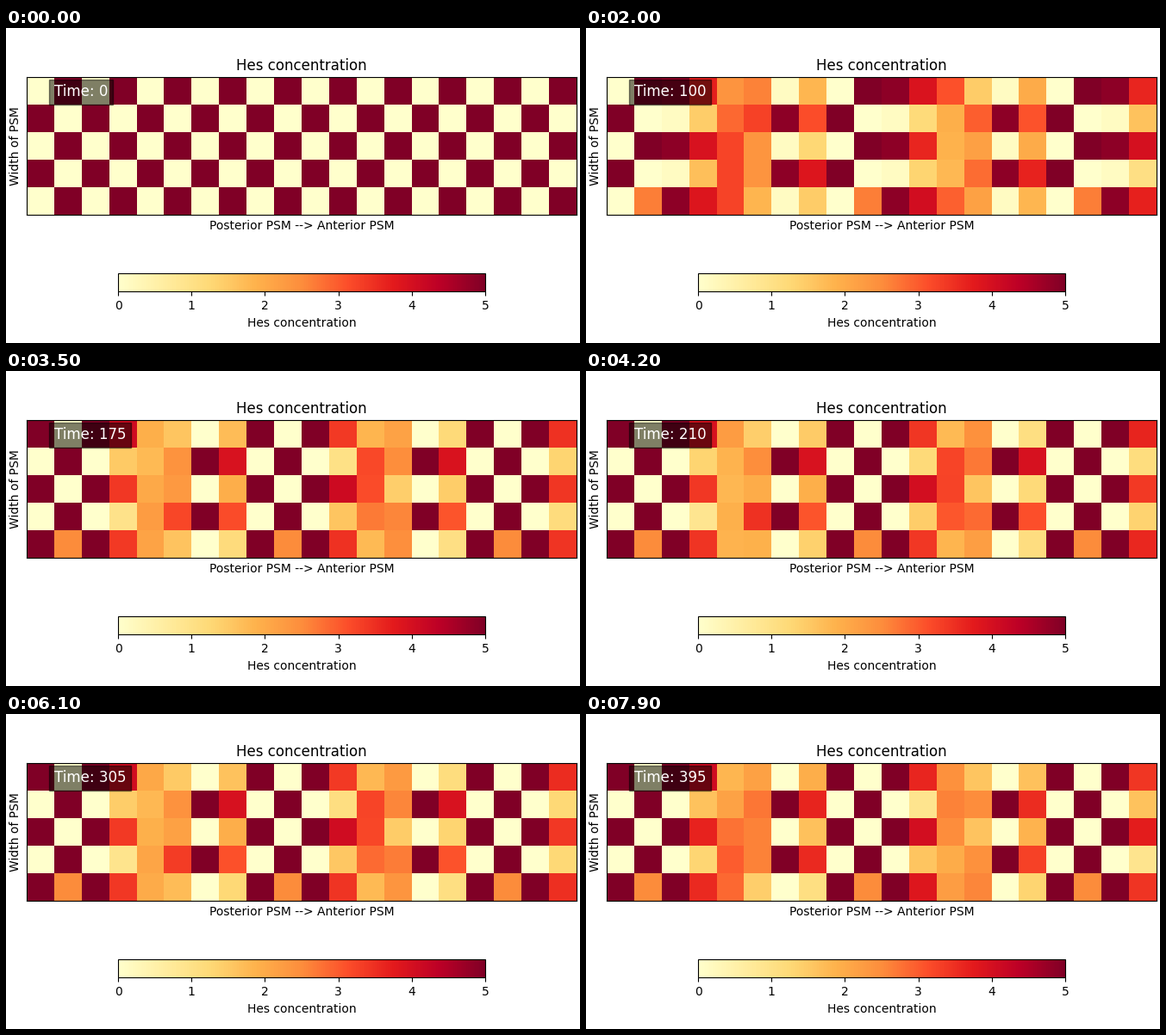
These frames come from a looping animation (666 by 366 pixels, 8 s). A matplotlib script:

```python
import numpy as np
import matplotlib.pyplot as plt
from matplotlib.animation import FuncAnimation

W, H, DPI = 666, 366, 100
ROWS, COLS = 5, 20
FRAMES, INTERVAL, MINUTES = 80, 100, 5
TOP, REST = 5, 2.5
PERIOD, CREST = 32.2, 175  # clock of the cells, in minutes
GAIN, WOBBLE = 3, 0.3

# The settled pattern repeats every eight columns:
# some swing with the clock, others hold one side of the checkerboard.
SWING = np.resize([1, 1, 0, 0, 0, 0, 0, 0], COLS)
HOLD = np.resize([0, 0, 1, -0.5, 0, 0.2, -1, 0.4], COLS)

row, col = np.indices((ROWS, COLS))
checker = 1 - 2 * ((row + col) % 2)
phase = np.random.default_rng(4).uniform(0, 2 * np.pi, (ROWS, COLS))
slack = 1 - np.maximum(SWING, abs(HOLD))
resting = (row == ROWS - 1) & (col % 8 == 1)


def ease(t, start, end):
    u = np.clip((t - start) / (end - start), 0, 1)
    return u * u * (3 - 2 * u)


def levels_at(t):
    angle = 2 * np.pi * (t - CREST) / PERIOD
    beat = np.clip(GAIN * np.cos(angle), -1, 1)
    loose = ease(t, 0, 60)     # columns lose the common beat
    settle = ease(t, 40, 110)  # the held columns lock in

    side = beat * (SWING + (1 - SWING) * (1 - loose)) + HOLD * settle
    noise = WOBBLE * loose * slack * np.cos(angle + phase)
    swing = checker * side * (1 - settle * resting) + noise
    return REST * (1 + np.clip(swing, -1, 1))


def add_axes(x, y, w, h):
    """Axes placed in pixels from the top left corner."""
    return fig.add_axes([x / W, 1 - (y + h) / H, w / W, h / H])


plt.rcParams["font.family"] = "DejaVu Sans"
fig = plt.figure(figsize=(W / DPI, H / DPI), dpi=DPI, facecolor="white")
ax = add_axes(24.05, 57.45, 638, 159.85)
image = ax.imshow(levels_at(0), cmap="YlOrRd", vmin=0, vmax=TOP,
                  aspect="auto", interpolation="nearest")
ax.set(xticks=[], yticks=[])
ax.set_title("Hes concentration", fontsize=12)
ax.set_xlabel("Posterior PSM --> Anterior PSM")
ax.set_ylabel("Width of PSM")
clock = ax.text(0.05, 0.895, "", transform=ax.transAxes, fontsize=12,
                color="white", va="center",
                bbox=dict(facecolor="black", alpha=0.5))

bar = fig.colorbar(image, cax=add_axes(130.05, 285.1, 426, 21.2),
                   orientation="horizontal", ticks=range(TOP + 1))
bar.set_label("Hes concentration")


def update(frame):
    t = frame * MINUTES
    image.set_data(levels_at(t))
    clock.set_text(f"Time: {t}")
    return image, clock


anim = FuncAnimation(fig, update, frames=FRAMES, interval=INTERVAL,
                     repeat=True, repeat_delay=0)
plt.show()
```
